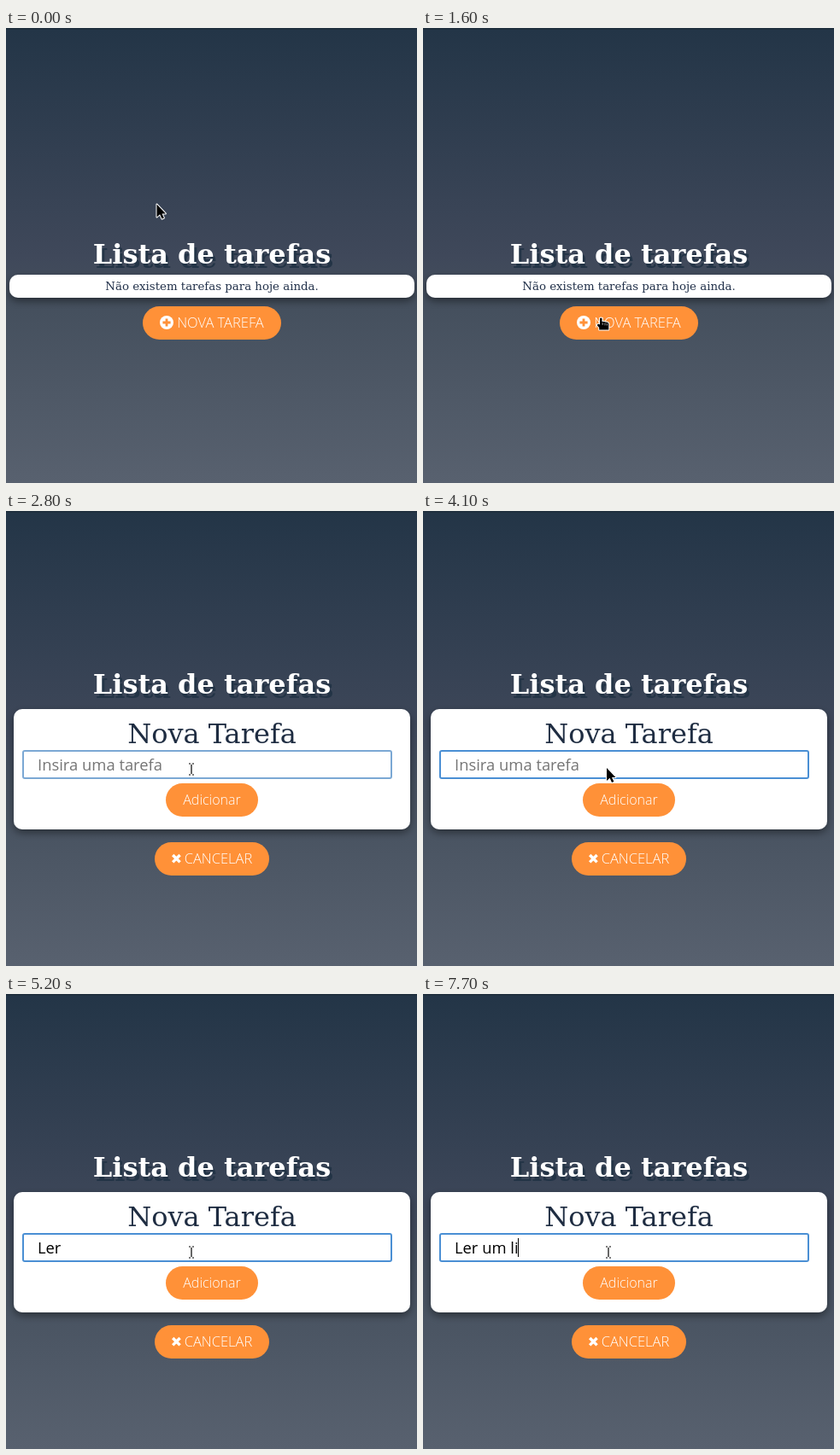
Write an HTML page that moves like this. It is 481 by 533 pixels and loops after 8000 ms.

```html
<!DOCTYPE html>
<html lang="pt">
<head>
<meta charset="utf-8">
<title>Lista de tarefas</title>
<style>
html, body { margin: 0; width: 100%; height: 100%; overflow: hidden; background: #3f485a; }
svg { display: block; width: 100%; height: 100%; }
text { font-family: "DejaVu Serif", serif; font-size: 13.333px; fill: #22314a; white-space: pre; }
.mid { text-anchor: middle; }
.title { font-size: 32px; font-weight: bold; }
.heading { font-size: 32px; fill: #1f2d42; }
.error { font-weight: bold; fill: #f00; }
.btn { fill: #ff9138; }
.label { font: 300 16.5px "Open Sans", sans-serif; fill: #fff; }
.field { font: 18.4px "Open Sans", sans-serif; }
.card { fill: #fff; filter: url(#shadow); }
.cursor { fill: #000; stroke: #fff; stroke-width: 2; stroke-linejoin: round; paint-order: stroke; }
</style>
</head>
<body>
<svg viewBox="0 0 481 533">
  <defs>
    <linearGradient id="sky" x2="0" y2="1">
      <stop stop-color="#233547"/>
      <stop offset=".5" stop-color="#3f485a"/>
      <stop offset=".6" stop-color="#444f5d"/>
      <stop offset="1" stop-color="#58616f"/>
    </linearGradient>
    <filter id="shadow" x="-10%" y="-100%" width="120%" height="300%">
      <feDropShadow dx="0" dy="4" stdDeviation="5" flood-color="#000" flood-opacity=".42"/>
    </filter>
  </defs>
  <rect width="481" height="533" fill="url(#sky)"/>
  <rect width="481" height="2" opacity=".12"/>

  <g id="title">
    <text class="mid title" x="244" y="281" style="fill:#233446">Lista de tarefas</text>
    <text class="mid title" x="241" y="276" style="fill:#fff">Lista de tarefas</text>
  </g>

  <g id="home">
    <rect class="card" x="4" y="289" width="474" height="27" rx="10"/>
    <text class="mid" x="241" y="307">Não existem tarefas para hoje ainda.</text>
    <rect class="btn" x="160" y="326" width="162" height="39" rx="19.5"/>
    <circle cx="188" cy="345" r="8" fill="#fff"/>
    <path d="M183.4 345h9.2M188 340.4v9.2" stroke="#ff9138" stroke-width="2.8"/>
    <text class="mid label" x="251" y="351">NOVA TAREFA</text>
  </g>

  <g id="form">
    <rect id="card" class="card" x="9" width="464" rx="10"/>
    <g id="upper">
      <text class="mid heading" x="241" y="272">Nova Tarefa</text>
      <rect id="box" fill="#fff"/>
      <text id="value" class="field" x="37" y="304"></text>
      <rect id="caret" y="286" width="1" height="22"/>
    </g>
    <text id="error" class="mid error" x="241" y="323">Este campo deve conter entre 3 e 45 caracteres</text>
    <g id="lower">
      <rect class="btn" x="187" y="319" width="108" height="39" rx="19.5"/>
      <text class="mid label" x="241" y="344" style="font-size:16px">Adicionar</text>
      <rect class="btn" x="174" y="388" width="134" height="39" rx="19.5"/>
      <path d="M195.2 403l8.4 8.4m0-8.4l-8.4 8.4" stroke="#fff" stroke-width="3.4"/>
      <text class="mid label" x="248.5" y="413">CANCELAR</text>
    </g>
  </g>

  <path id="arrow" class="cursor" d="M1 1.5V16.5L4.6 13.2 7 18.6 9.4 17.5 7 12.4H11.4Z"/>
  <g id="hand">
    <path class="cursor" d="M-2 1.2Q-.8-.4 .5 1.2V5H3L7 6Q8.6 6.4 8.3 8.4V14.5H-2.8V12L-5 9.4Q-5.2 7.6-3.4 7.8L-2 8.6Z"/>
    <path d="M1.2 6v3M4 6.4v3M6.4 7v2.6" stroke="#fff" stroke-width=".6"/>
  </g>
  <g id="beam" fill="none">
    <path d="M-3-6.5H3M0-6.5V6.5M-3 6.5H3" stroke="#fff" stroke-width="3"/>
    <path d="M-3-6.5H-1M1-6.5H3M0-5.5V5.5M-3 6.5H-1M1 6.5H3" stroke="#000" stroke-width="1.2"/>
  </g>
</svg>
<script>
const LOOP = 8000;
const el = {};
document.querySelectorAll('svg [id]').forEach(n => el[n.id] = n);
const pen = document.createElement('canvas').getContext('2d');

// [start, typed text, caret visible]
const typing = [
  [0, '', 0], [4000, 'L', 1], [4100, '', 0], [4200, 'L', 1], [4400, 'Le', 1],
  [5200, 'Ler ', 0], [5800, 'Ler ', 1], [6400, 'Ler ', 0], [6700, 'Ler u', 1],
  [7100, 'Ler um', 1], [7300, 'Ler um ', 1], [7500, 'Ler um l', 1], [7600, 'Ler um li', 1]
];

const show = (node, on) => node.setAttribute('display', on ? 'inline' : 'none');
const move = (node, x, y) => node.setAttribute('transform', `translate(${x} ${y})`);
const set = (node, attrs) => { for (const k in attrs) node.setAttribute(k, attrs[k]); };

function cursorAt(t) {
  if (t < 1900) {
    const p = Math.min(8, Math.max(0, Math.floor(t / 100) - 8)) / 8;
    const e = p * p * (3 - 2 * p);
    const y = 205 + 134 * e;
    return [y > 325 ? 'hand' : 'arrow', 175.5 + 33.5 * Math.sin(e * Math.PI / 2), y];
  }
  if (t < 2400) return ['hand', 209, 339];
  if (t < 2500) return ['hand', 225, 323];
  if (t >= 4000 && t < 5200) return ['arrow', 214, 299.5];
  return ['beam', 217, 302.5];
}

function drawField(t) {
  const [, text, caret] = typing.findLast(s => t >= s[0]);
  el.value.textContent = text || 'Insira uma tarefa';
  el.value.style.fill = text ? '#000' : '#757575';
  pen.font = '18.4px "Open Sans", sans-serif';
  el.caret.setAttribute('x', Math.floor(37 + pen.measureText(text).width));
  show(el.caret, caret);
  const focus = t >= 2800;
  const w = focus ? 2 : 1;
  set(el.box, {
    x: 19 + w / 2, y: 280 + w / 2, width: 433 - w, height: 34 - w, rx: 2,
    'stroke-width': w, stroke: !focus ? '#b0b0b0' : t < 2900 ? '#7ba8d4' : '#4a8fd4'
  });
  return text.length === 1 || text.length === 2;
}

function draw(t) {
  const open = t >= 1900;
  const invalid = drawField(t);
  const up = invalid ? -19 : 0;
  show(el.home, !open);
  show(el.form, open);
  show(el.error, invalid);
  move(el.title, 0, open ? up - 62 : 0);
  move(el.upper, 0, up);
  move(el.lower, 0, invalid ? 18 : 0);
  set(el.card, { y: 232 + up, height: invalid ? 178 : 141 });

  const [kind, x, y] = cursorAt(t);
  for (const k of ['arrow', 'hand', 'beam']) show(el[k], k === kind);
  move(el[kind], x, y);
}

const start = performance.now();
function tick() {
  draw((performance.now() - start) % LOOP);
  requestAnimationFrame(tick);
}
tick();
</script>
</body>
</html>
```
